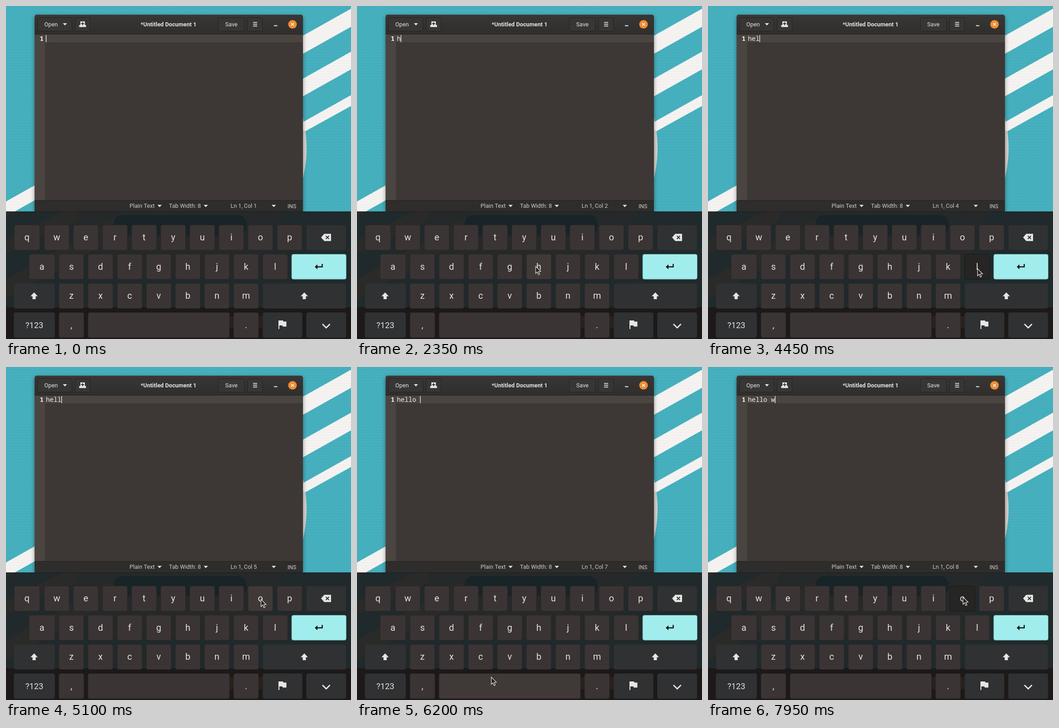
Recreate the animation shown at these times as an HTML page. Size 761 by 736 pixels, loop 8 s.

```html
<!DOCTYPE html>
<html lang="en">
<head>
<meta charset="utf-8">
<title>On-screen keyboard</title>
<style>
  html, body { margin: 0; width: 100%; height: 100%; overflow: hidden; background: #45afbd; }
  svg { display: block; width: 100%; height: 100%; }
  text { font-family: Roboto, "Open Sans", sans-serif; font-size: 12.75px; fill: #e4e2e0; }
  .status text { fill: #cfccca; }
  .mono { font-family: "Noto Sans Mono", "DejaVu Sans Mono", monospace; font-size: 14.2px; fill: #efedeb; white-space: pre; }
  .btn { fill: #383635; stroke: #242221; }
  .key rect { fill: #3b3434; stroke: #2a2625; }
  .key.special rect { fill: #2f3132; stroke: #292b2c; }
  .key.enter rect { fill: #a1eded; stroke: #5b8a8b; }
  .key.hover rect { fill: #403938; }
  .key.special.hover rect { fill: #353738; }
  .key.down rect { fill: #272524; stroke: #191817; }
  .key text { font-size: 20px; text-anchor: middle; }
  .key.label text { font-size: 18.3px; }
  .icon { fill: #e8e6e4; }
</style>
</head>
<body>
<svg viewBox="0 0 761 736" preserveAspectRatio="none">
  <defs>
    <pattern id="weave" width="7" height="6" patternUnits="userSpaceOnUse">
      <path d="M0 .5H7" stroke="#000" stroke-opacity=".025"/>
      <path d="M0 3.5H4M5 5.5H7" stroke="#fff" stroke-opacity=".035"/>
    </pattern>
    <linearGradient id="bar" x2="0" y2="1">
      <stop stop-color="#393736"/><stop offset="1" stop-color="#302e2d"/>
    </linearGradient>
    <filter id="shadow" x="-10%" y="-10%" width="120%" height="120%">
      <feDropShadow dx="0" dy="3" stdDeviation="5" flood-opacity=".42"/>
    </filter>
    <clipPath id="panel"><path d="M0 454H761V736H0Z"/></clipPath>
  </defs>

  <!-- wallpaper -->
  <path d="M0 0H761V736H0Z" fill="#45afbd"/>
  <circle cx="383" cy="314" r="280" fill="#d8d5cf"/>
  <path d="M0 0H640V245L655 247V454H0Z" fill="#45afbd"/>
  <g fill="#f4f3f1">
    <path d="M761 6L640 74V114L761 46Z"/>
    <path d="M761 101L640 169V208L761 140Z"/>
    <path d="M761 197L640 265L660 277L761 221Z"/>
    <path d="M0 432L80 387V420L0 465Z"/>
  </g>
  <path d="M0 0H761V454H0Z" fill="url(#weave)"/>

  <!-- editor window -->
  <path d="M63 454V25Q63 19 69 19H649Q655 19 655 25V454Z" fill="#3e3736" filter="url(#shadow)"/>
  <path d="M63 63V25Q63 19 69 19H649Q655 19 655 25V63Z" fill="url(#bar)"/>
  <path d="M68 19.5H650" stroke="#4a4847"/>
  <path d="M63 62.5H655" stroke="#242221"/>
  <path d="M63 63H655V80H86V429H63Z" fill="#4b4541"/>
  <path d="M63 429H655V454H63Z" fill="#2f2d2c"/>
  <path d="M63 429.5H655" stroke="#232120"/>
  <g class="btn">
    <rect x="69.5" y="25.5" width="76" height="30" rx="3"/>
    <rect x="152.5" y="25.5" width="33" height="30" rx="3"/>
    <rect x="468.5" y="25.5" width="57" height="30" rx="3"/>
    <rect x="532.5" y="25.5" width="33" height="30" rx="3"/>
  </g>
  <text x="84.5" y="44.5">Open</text>
  <text x="297" y="44.5" font-weight="700">*Untitled Document 1</text>
  <text x="483.5" y="44.5">Save</text>
  <g class="icon">
    <path d="M125.5 38H134.5L130 43Z"/>
    <path d="M164 34H174V43H164Z"/>
    <path d="M161.5 42H176.5V46.5H161.5Z"/>
    <path d="M545 35.5H554V37.3H545ZM545 39.5H554V41.3H545ZM545 43.5H554V45.3H545Z"/>
    <path d="M591 42.5H598.5V44.5H591Z"/>
  </g>
  <path d="M169 35.5V42.5M165.5 39H172.5" stroke="#333130" stroke-width="1.8"/>
  <circle cx="632" cy="40.5" r="9.5" fill="#ee8c33"/>
  <path d="M629 37.5L635 43.5M635 37.5L629 43.5" stroke="#fff" stroke-width="1.7"/>
  <g class="status">
    <text x="272.5" y="446">Plain Text</text>
    <text x="359.5" y="446">Tab Width: 8</text>
    <text id="pos" x="495.5" y="446" style="font-size:12.5px"></text>
    <text x="621" y="446.5" style="font-size:12.3px">INS</text>
    <path class="icon" d="M334 439.5H343.5L338.7 444.5ZM436 439.5H445.5L440.7 444.5ZM586 439.5H595.5L590.7 444.5Z"/>
  </g>
  <text class="mono" x="74.5" y="76.5" font-weight="700">1</text>
  <text class="mono" id="typed" x="88" y="76.5"></text>
  <path id="caret" d="M.5 64V80" stroke="#fff" stroke-width="1.2"/>

  <!-- keyboard panel -->
  <g clip-path="url(#panel)">
    <path d="M0 454H761V736H0Z" fill="#20292b"/>
    <g fill="#2a2a29">
      <path d="M0 454H20L0 465Z"/>
      <path d="M0 548V517L125 454H160L155 477Z"/>
      <path d="M0 648V604L240 470V515Z"/>
      <path d="M155 474L180 505L210 600H590Q560 520 625 454H160Z" opacity=".5"/>
      <path d="M240 506H525V590H240Z" opacity=".5"/>
    </g>
    <rect x="237" y="462" width="294" height="45" rx="20" fill="#182427"/>
    <path d="M0 666H761V736H0Z" fill="#1c1918"/>
    <path d="M36 684H108V716H36Z" fill="#1a2224"/>
    <path d="M493 686H574V712H493Z" fill="#2a211b"/>
    <path d="M0 454.5H761" stroke="#1b1d1e"/>
  </g>
  <g id="keys"></g>
  <g class="icon">
    <path d="M695 511.5L702 503.5H717V519.5H702Z"/>
    <path d="M62 633L70 641.5H65.5V648H58.5V641.5H54Z"/>
    <path d="M658 633L666 641.5H661.5V648H654.5V641.5H650Z"/>
    <path d="M601 695H611L612 697.5H618.5V708.5H610.5L609.5 706H603V714H601Z"/>
  </g>
  <path d="M705.5 508L712.5 515M712.5 508L705.5 515" stroke="#2f3132" stroke-width="2"/>
  <path d="M697.5 570V576.5H684" fill="none" stroke="#151515" stroke-width="2.5"/>
  <path d="M681 576.5L687 571V582Z" fill="#151515"/>
  <path d="M698 703L706.3 711.3L714.6 703" fill="none" stroke="#e8e6e4" stroke-width="2.8"/>

  <path id="pointer" d="M.5 .5V16.5L4.2 13L6.7 19L9.3 17.9L6.8 12H11.8Z"
    fill="#262322" stroke="#f2f0ee" stroke-width="1.1"/>
</svg>
<script>
const LOOP = 8000, STEP = 50, CHAR_W = 8.53, PITCH = 64.2, KEY_H = 55.5;
const $ = id => document.getElementById(id);
const keys = [];

function addKey(name, x, y, w, kind = '') {
  const el = document.createElementNS('http://www.w3.org/2000/svg', 'g');
  const label = kind.startsWith('icon') || name === ' ' ? '' :
    `<text x="${x + w / 2}" y="${y + 34}">${name}</text>`;
  el.innerHTML = `<rect x="${x}" y="${y}" width="${w}" height="${KEY_H}" rx="4"/>${label}`;
  const cls = 'key ' + kind.replace('icon', '');
  $('keys').append(el);
  keys.push({ name, x, y, w, el, cls });
}

function addRow(letters, x, y) {
  [...letters].forEach((c, i) => addKey(c, x + PITCH * i, y, 55));
}

addKey('q', 18, 484, 56.5);
addRow('wertyuiop', 84.4, 484);
addKey('backspace', 662.5, 484, 87.5, 'icon special');
addKey('a', 51, 548.5, 56.5);
addRow('sdfghjkl', 116.8, 548.5);
addKey('enter', 630, 548.5, 120.5, 'icon enter');
addKey('shift', 17.5, 613, 90, 'icon special');
addRow('zxcvbnm', 116.8, 613);
addKey('shift', 566.5, 613, 183.5, 'icon special');
addKey('?123', 17.5, 677.5, 90, 'special label');
addKey(',', 116.8, 677.5, 55);
addKey(' ', 181, 677.5, 312);
addKey('.', 502, 677.5, 55);
addKey('flag', 566.5, 677.5, 87, 'icon special');
addKey('hide', 662.5, 677.5, 87.5, 'icon special');

// pointer stops: time, x, y
const path = [
  [450, 775, 8], [750, 100, 636], [850, 274, 637], [1150, 274, 637],
  [1500, 341, 574], [2000, 398, 576], [2300, 398, 576], [2900, 176, 514],
  [3200, 176, 514], [3700, 561, 571], [3800, 561, 571], [4000, 614, 583],
  [4200, 594, 580], [4500, 594, 580], [4650, 572, 541], [5050, 562, 513],
  [5300, 562, 513], [5750, 342, 717], [6100, 342, 717], [6500, 46, 512],
  [6750, 100, 506], [6950, 111, 502], [7200, 111, 502], [7600, 541, 514],
  [7800, 562, 508], [LOOP, 562, 508]
];

// key presses: character, down, up
const presses = [
  ['h', 2150, 2300], ['e', 3000, 3200], ['l', 4050, 4200], ['l', 4400, 4500],
  ['o', 5150, 5300], [' ', 5950, 6100], ['w', 7000, 7150], ['o', 7850, LOOP]
];

function pointerAt(t) {
  const i = path.findIndex(p => p[0] > t);
  const [t0, x0, y0] = path[i - 1], [t1, x1, y1] = path[i];
  const u = (t - t0) / (t1 - t0), k = u * u * (3 - 2 * u);
  return [x0 + (x1 - x0) * k, y0 + (y1 - y0) * k];
}

function draw(time) {
  const t = Math.floor((time % LOOP) / STEP + 1e-4) * STEP % LOOP;
  const visible = t >= 500;
  const [x, y] = visible ? pointerAt(t) : [-99, -99];
  $('pointer').setAttribute('transform', `translate(${x} ${y})`);

  const held = presses.find(p => t >= p[1] && t < p[2]);
  for (const k of keys) {
    const over = x >= k.x && x <= k.x + k.w && y >= k.y && y <= k.y + KEY_H;
    const state = held && held[0] === k.name ? ' down' : over ? ' hover' : '';
    k.el.setAttribute('class', k.cls + state);
  }

  const typed = presses.filter(p => t >= p[2] + STEP).map(p => p[0]).join('');
  $('typed').textContent = typed;
  $('caret').setAttribute('transform', `translate(${88 + CHAR_W * typed.length} 0)`);
  $('pos').textContent = `Ln 1, Col ${typed.length + 1}`;
}

const start = performance.now();
function tick() {
  draw(performance.now() - start);
  requestAnimationFrame(tick);
}
tick();
</script>
</body>
</html>
```
